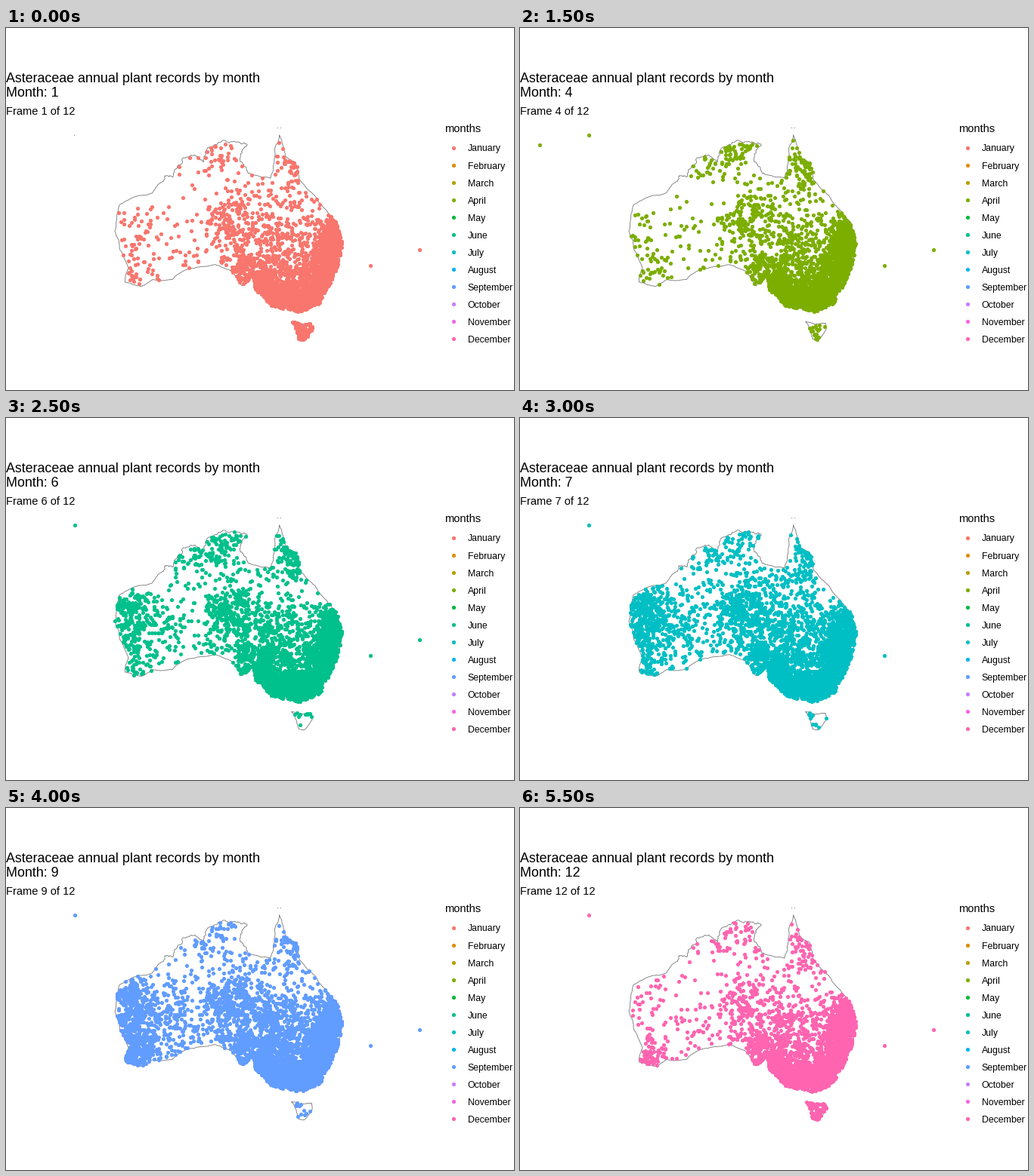
A matplotlib script that plays this animation: 672x480 px, repeating every 6 s.

```python
import numpy as np
import matplotlib.pyplot as plt
from matplotlib.animation import FuncAnimation
from matplotlib.path import Path

W, H, DPI = 672, 480, 96
plt.rcParams["font.family"] = "Liberation Sans"

MONTHS = ["January", "February", "March", "April", "May", "June", "July",
          "August", "September", "October", "November", "December"]
COLORS = ["#F8766D", "#DE8C00", "#B79F00", "#7CAE00", "#00BA38", "#00C08B",
          "#00BFC4", "#00B4F0", "#619CFF", "#C77CFF", "#F564E3", "#FF64B0"]

# Key capes and bays as (longitude, latitude), clockwise.
MAINLAND = [
    (142.5, -10.7), (143.6, -14.1), (145.3, -15.0), (146.1, -17.9),
    (148.8, -20.4), (150.7, -22.6), (152.9, -25.3), (153.6, -28.7),
    (153.0, -31.0), (150.1, -36.4), (149.9, -37.5), (146.3, -39.0),
    (144.0, -38.6), (141.0, -38.0), (139.7, -36.7), (138.3, -35.6),
    (137.8, -33.0), (135.9, -34.9), (134.2, -32.7), (131.2, -31.5),
    (126.0, -32.3), (123.5, -33.9), (120.0, -33.9), (118.0, -35.0),
    (115.1, -34.3), (115.7, -32.0), (113.3, -26.1), (114.1, -21.9),
    (116.8, -20.6), (119.9, -20.0), (122.2, -17.2), (123.6, -17.4),
    (124.6, -15.5), (126.8, -13.9), (129.0, -15.0), (130.8, -12.4),
    (132.6, -11.5), (136.8, -12.2), (135.6, -15.0), (139.2, -17.4),
    (140.9, -17.6), (141.6, -15.0), (141.7, -12.8)]
TASMANIA = [(144.7, -40.7), (146.4, -41.1), (148.2, -40.9), (148.3, -42.0),
            (146.9, -43.6), (146.0, -43.5)]

# The always crowded south-eastern range.
RIDGE = [(152.7, -26.6), (151.5, -30.6), (150.3, -34.0), (147.0, -37.0),
         (142.0, -37.2), (138.8, -35.1)]
# x, y, spread, records per square pixel at the seasonal peak
HOTSPOTS = [
    (318, 323, 18, .25), (170, 327, 15, .45), (160, 262, 20, .28),
    (215, 285, 28, .05), (240, 182, 15, .06), (284, 160, 14, .11),
    (295, 255, 16, .14), (378, 182, 17, .10), (375, 285, 40, .07),
    (305, 270, 35, .05), (365, 318, 26, .10)]
# Remote islands and the months without or with records.
ALL_YEAR = set(range(1, 13))
REMOTE = {(547, 293.5): ALL_YEAR - {5, 7}, (482, 314.5): ALL_YEAR,
          (459.5, 320.5): {3, 5}, (90.5, 141.5): {4, 5, 6, 7, 8, 9, 12},
          (26, 155): {4, 5, 11}}
DENSITY, CLUMP = 0.5, 6


def project(lonlat):
    lon, lat = np.asarray(lonlat, float).T
    return np.column_stack([7.45 * lon - 700, 53.9 - 8.25 * lat])


def roughen(points, rng, levels=5):
    """Closed outline with displaced midpoints, more rugged in the north-west."""
    for _ in range(levels):
        step = np.roll(points, -1, axis=0) - points
        middle = points + step / 2
        rugged = (middle[:, 0] < 325) & (middle[:, 1] < 205)
        amount = np.where(rugged, .24, .07) * rng.uniform(-1, 1, len(points))
        normal = np.column_stack([-step[:, 1], step[:, 0]])
        middle += normal * amount[:, None]
        points = np.stack([points, middle], axis=1).reshape(-1, 2)
    return points


def ridge_distance(points):
    line = project(RIDGE)
    k = np.arange(len(line))
    t = np.linspace(0, k[-1], 80)
    dense = np.column_stack([np.interp(t, k, line[:, i]) for i in (0, 1)])
    return np.min([np.hypot(*(points - p).T) for p in dense], axis=0)


def bump(x, y, spread):
    return np.exp(-np.hypot(sites[:, 0] - x, sites[:, 1] - y) ** 2 / (2 * spread ** 2))


def season(month, floor, peak):
    """Yearly wave from floor up to 1 at the peak month."""
    return floor + (1 - floor) * np.cos(np.pi * (month - peak) / 12) ** 8


rng = np.random.default_rng(8)
mainland = roughen(project(MAINLAND), rng)
tasmania = roughen(project(TASMANIA), rng)

# Collecting sites lie in small clumps, some visited more than others.
low, high = np.array([140, 128]), np.array([450, 418])
clumps = rng.uniform(low, high, (int(DENSITY * np.prod(high - low) / CLUMP), 2))
sites = np.repeat(clumps, CLUMP, axis=0)
sites = sites + rng.normal(0, 3, sites.shape)
visits = np.repeat(4 * rng.random(len(clumps)) ** 3, CLUMP)
on_island = Path(tasmania).contains_points(sites)
land = Path(mainland).contains_points(sites) | on_island
sites, visits, on_island = sites[land], visits[land], on_island[land]
ridge = .4 * np.exp(-(ridge_distance(sites) / 13) ** 2 / 2)


def records(month):
    rate = np.full(len(sites), .006 * season(month, .1, 7.5))
    for x, y, spread, top in HOTSPOTS:
        # Flowering moves south through the year; the east varies least.
        peak = 5 + (y - 150) / 40
        floor = np.clip((x - 150) / 400, .05, .6)
        rate += top * season(month, floor, peak) * bump(x, y, spread)
    rate = rate * visits + ridge
    rate[on_island] = .25 * season(month, .12, 1)
    chance = np.random.default_rng(month).random(len(sites))
    remote = [spot for spot, months in REMOTE.items() if month in months]
    return np.vstack([sites[chance < rate / DENSITY], remote])


fig = plt.figure(figsize=(W / DPI, H / DPI), dpi=DPI, facecolor="white")
ax = fig.add_axes([0, 0, 1, 1])
ax.set(xlim=(0, W), ylim=(H, 0))
ax.axis("off")


def px(size):
    return size * 72 / DPI


def label(x, y, text, size):
    return ax.text(x, y, text, fontsize=px(size), color="black", va="baseline")


def dots(x, y, color):
    return ax.plot(x, y, "o", ms=px(5.2), mew=0, color=color,
                   antialiased=False, zorder=3)[0]


for outline in (mainland, tasmania):
    ax.plot(*np.vstack([outline, outline[:1]]).T, color="#7F7F7F",
            lw=px(.9), zorder=1)
ax.plot([90, 359, 363], [141.5, 131.5, 132], "s", ms=px(1), mew=0,
        color="#7F7F7F", zorder=1)

label(0, 72, "Asteraceae annual plant records by month", 17.85)
month_text = label(0, 91, "", 17.85)
frame_text = label(0, 115, "", 14.67)
label(580.5, 138, "months", 14.67)
for i, (name, color) in enumerate(zip(MONTHS, COLORS)):
    row = 158.5 + 23.04 * i
    dots([592], [row], color)
    label(610.5, row + 5, name, 12.2)

points = dots([], [], COLORS[0])
monthly = [records(m) for m in range(1, 13)]


def update(i):
    points.set_data(*monthly[i].T)
    points.set_color(COLORS[i])
    month_text.set_text(f"Month: {i + 1}")
    frame_text.set_text(f"Frame {i + 1} of 12")
    return points, month_text, frame_text


anim = FuncAnimation(fig, update, frames=12, interval=500, repeat=True,
                     repeat_delay=0)
plt.show()
```
